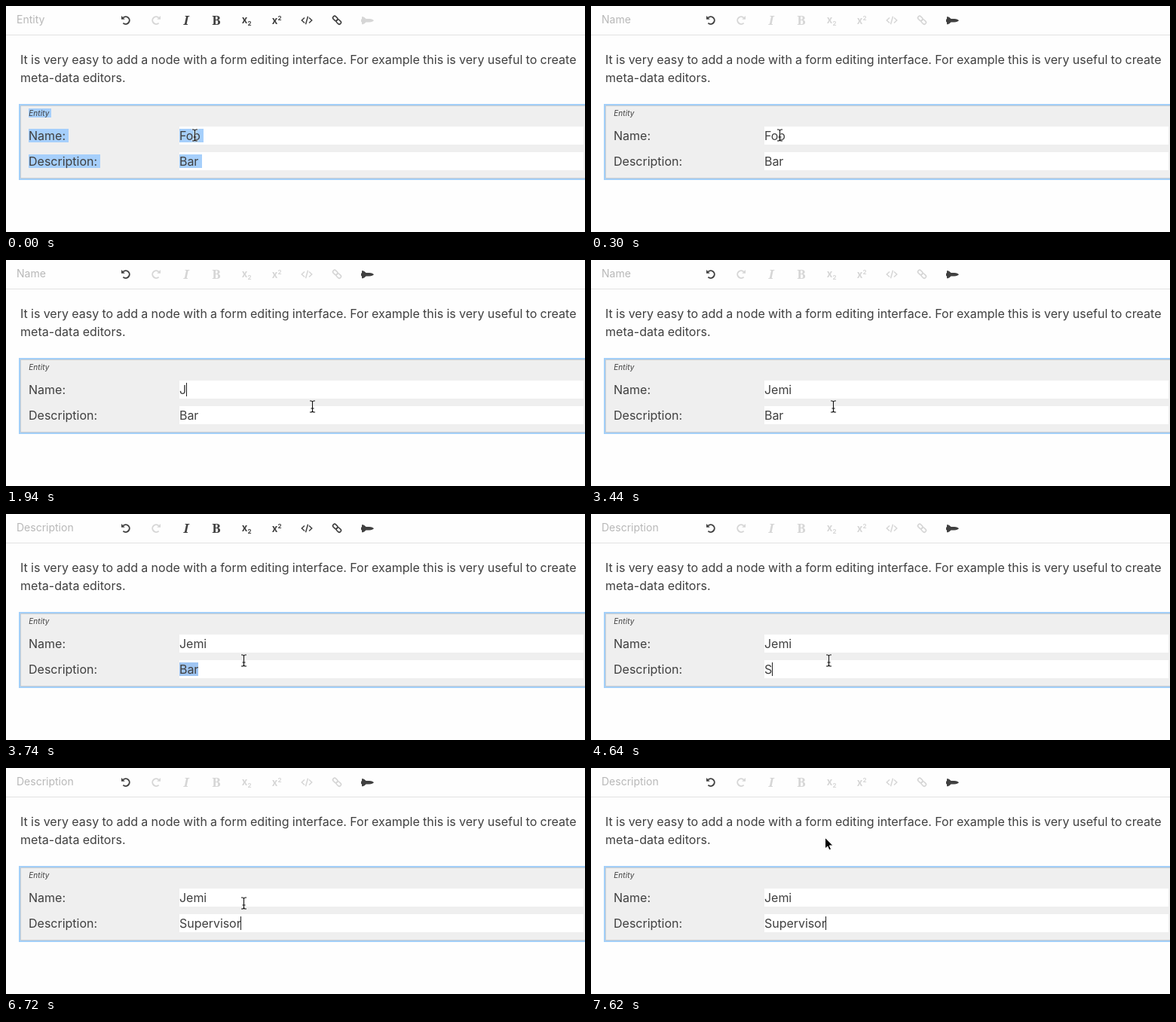
These frames come from a looping animation (768x300 px, 8000 ms). An HTML page:

```html
<!DOCTYPE html>
<html lang="en">
<head>
<meta charset="utf-8">
<title>Form node editor</title>
<style>
  html, body { margin: 0; width: 100%; height: 100%; overflow: hidden; background: #fefefe; }
  svg { display: block; }
  text { font: 16px Inter, sans-serif; fill: #3f3f3f; white-space: pre; }
  .para { letter-spacing: .04px; word-spacing: -.35px; }
  .value { letter-spacing: -.04px; }
  #label { font-size: 14px; fill: #b8b8b8; }
  .tag { font-size: 10px; font-style: italic; letter-spacing: .08px; }
  .icon { fill: #404040; stroke: #404040; stroke-width: 0; }
  .icon text { font: bold 17px "Noto Serif", serif; fill: inherit; text-anchor: middle; }
  .icon .slant { font-style: italic; }
  .icon .x { font: bold 13px Inter, sans-serif; }
  .icon .small { font: bold 8px Inter, sans-serif; }
  .line { fill: none; stroke-width: 1.6; }
  .off { fill: #d6d6d6; stroke: #d6d6d6; }
  .mark { fill: #a6cffb; }
</style>
</head>
<body>
<svg width="768" height="300" viewBox="0 0 768 300">
  <defs>
    <g id="turn">
      <path class="line" style="stroke-width:2" d="M-3.6-3A4.9 4.9 0 1 1-3.6 4"/>
      <path d="M-6-5.5V-.8H-1.3Z"/>
    </g>
    <path id="bar" d="M-3-7.5H-2Q0-7.5 0-5.5V5.5Q0 7.5-2 7.5H-3M3-7.5H2Q0-7.5 0-5.5M3 7.5H2Q0 7.5 0 5.5M-1.5 2.5H1.5"/>
  </defs>
  <path d="M0 38.5H768" stroke="#e2e2e2"/>
  <text id="label" x="14" y="23"></text>

  <g class="icon" transform="translate(159 18.6)"><use href="#turn"/></g>
  <g class="icon off" transform="translate(199 18.6) scale(-1 1)"><use href="#turn"/></g>
  <g id="tools">
    <g class="icon"><text class="slant" x="239" y="25">I</text></g>
    <g class="icon"><text x="279" y="25">B</text></g>
    <g class="icon"><text class="x" x="316.5" y="23">x</text><text class="small" x="323" y="25.5">2</text></g>
    <g class="icon"><text class="x" x="356.5" y="23.5">x</text><text class="small" x="363" y="18.5">2</text></g>
    <g class="icon"><path class="line" style="stroke-width:1.5" d="M396 15.5 392.3 19 396 22.5M402 15.5 405.7 19 402 22.5M400.5 13.8 397.5 24.2"/></g>
    <g class="icon" transform="translate(439 18.8) rotate(45)">
      <rect class="line" x="-6.6" y="-2.3" width="6.8" height="4.6" rx="2"/>
      <rect class="line" x="-.2" y="-2.3" width="6.8" height="4.6" rx="2"/>
    </g>
  </g>
  <path id="shuttle" class="icon" d="M472 14.3H473.6Q475.6 15 477.5 17H482Q486.5 17.4 488 19.3Q486.5 21.2 482 21.6H477.5Q475.6 23.6 473.6 24.3H472V21.2H471V17.4H472Z"/>

  <text class="para" x="19" y="77">It is very easy to add a node with a form editing interface. For example this is very useful to create</text>
  <text class="para" x="19" y="101">meta-data editors.</text>

  <rect x="18.5" y="131.5" width="780" height="98" fill="#efefef" stroke="#a3cff8" stroke-width="3"/>
  <path d="M768 132.5H19.5V228.5H768" fill="none" stroke="#c9cdd1"/>
  <path d="M230 160H766V184H230ZM230 194H766V218H230Z" fill="#fff"/>
  <path id="all" class="mark" d="M30 136H60V148H30ZM30 163H83V181H30ZM30 197H125V215H30ZM230 163H262V181H230ZM230 197H260V215H230Z"/>
  <rect id="mark" x="230" height="18" fill="#9fc5f2"/>
  <text class="tag" x="30.2" y="146">Entity</text>
  <text x="30" y="178">Name:</text>
  <text x="30" y="212">Description:</text>
  <text id="name" class="value" x="230" y="178"></text>
  <text id="desc" class="value" x="230" y="212"></text>
  <rect id="caret" width="1" height="18" fill="#222"/>

  <g id="mouse">
    <g id="beam" fill="none" stroke-linecap="square" transform="translate(0 -.5)">
      <use href="#bar" stroke="#fff" stroke-opacity=".7" stroke-width="2.4"/>
      <use href="#bar" stroke="#111" stroke-width="1.1"/>
    </g>
    <path id="arrow" stroke="#fff" d="M0 0V14.8L3.3 11.7 5.5 16.6 8 15.5 5.9 10.7H10.5Z"/>
  </g>
</svg>
<script>
const $ = id => document.getElementById(id);
const LOOP = 8000;
const labels = ['Entity', 'Name', 'Description'];

// time, active field, name, description, selection or caret mode
const edits = [
  [0, 0, 'Foo', 'Bar', 'all'],
  [300, 1, 'Foo', 'Bar', 'blank'],
  [450, 1, 'Foo', 'Bar', 'word'],
  [1940, 1, 'J', 'Bar', 'caret'],
  [2090, 1, 'Je', 'Bar', 'caret'],
  [2390, 1, 'Jem', 'Bar', 'caret'],
  [2540, 1, 'Jemi', 'Bar', 'caret'],
  [3140, 1, 'Jemi', 'Bar', 'blank'],
  [3590, 1, 'Jemi', 'Bar', 'caret'],
  [3740, 2, 'Jemi', 'Bar', 'word'],
  [4640, 2, 'Jemi', 'S', 'caret'],
  [4790, 2, 'Jemi', 'Sup', 'caret'],
  [4940, 2, 'Jemi', 'Super', 'caret'],
  [5240, 2, 'Jemi', 'Superv', 'caret'],
  [5390, 2, 'Jemi', 'Supervis', 'caret'],
  [5540, 2, 'Jemi', 'Superviso', 'caret'],
  [5680, 2, 'Jemi', 'Supervisor', 'caret'],
  [6130, 2, 'Jemi', 'Supervisor', 'blank'],
  [6580, 2, 'Jemi', 'Supervisor', 'caret'],
  [7170, 2, 'Jemi', 'Supervisor', 'blank'],
  [7620, 2, 'Jemi', 'Supervisor', 'caret']
];

// time, x, y
const moves = [
  [0, 250.5, 172], [740, 335.5, 182], [890, 406.5, 195],
  [3290, 370.5, 195], [3440, 321.5, 195], [3590, 315.5, 195],
  [6430, 315.5, 191], [6580, 315.5, 180], [6730, 314.5, 162], [6880, 313.5, 140],
  [7020, 312.5, 120], [7170, 311.5, 102], [7320, 310.5, 92.3]
];

const at = (list, t) => list.findLast(step => step[0] <= t);
const show = (id, on) => $(id).style.display = on ? '' : 'none';

function draw(t) {
  const [, field, name, desc, mode] = at(edits, t);
  const [, x, y] = at(moves, t);

  $('label').textContent = labels[field];
  $('name').textContent = name;
  $('desc').textContent = desc;
  const selected = mode === 'all' || mode === 'word';
  for (const icon of $('tools').children) icon.classList.toggle('off', !selected);
  $('shuttle').classList.toggle('off', field === 0);

  const width = $(field === 2 ? 'desc' : 'name').getComputedTextLength();
  const top = field === 2 ? 197 : 163;
  $('mark').setAttribute('width', Math.floor(width));
  $('mark').setAttribute('y', top);
  $('caret').setAttribute('x', Math.round(229.8 + width));
  $('caret').setAttribute('y', top);
  show('all', mode === 'all');
  show('mark', mode === 'word');
  show('caret', mode === 'caret');

  $('mouse').setAttribute('transform', `translate(${x} ${y})`);
  show('beam', y > 160);
  show('arrow', y <= 160);
}

const start = performance.now();
function tick() {
  draw((performance.now() - start) % LOOP);
  requestAnimationFrame(tick);
}
tick();
</script>
</body>
</html>
```
